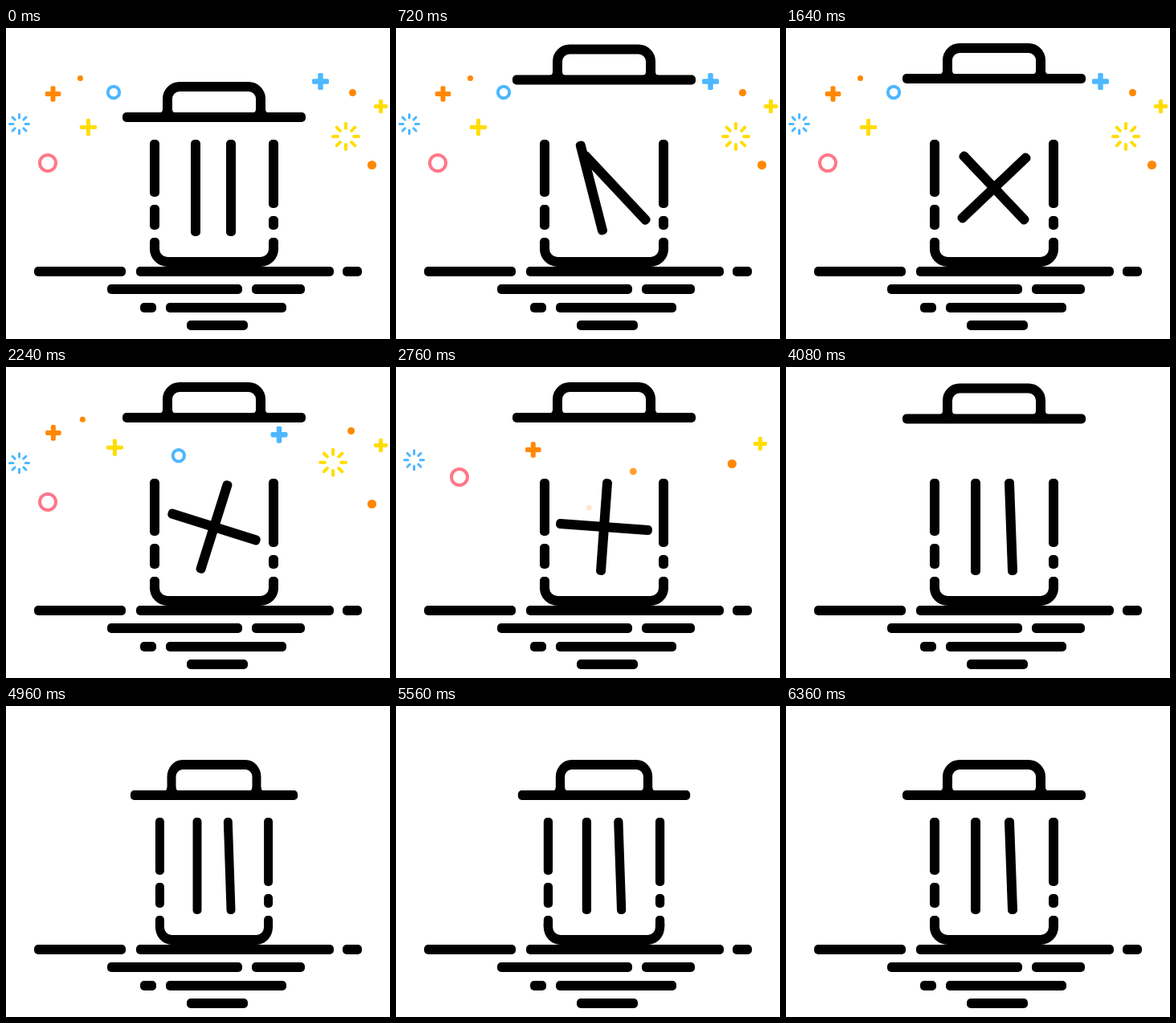
Recreate the animation shown at these times as an HTML page with a canvas. Size 478 px wide and 387 px high, loop 7200 ms.

```html
<!DOCTYPE html>
<html lang="en">
<head>
<meta charset="utf-8">
<title>Hungry trash can</title>
<style>
html, body { margin: 0; width: 100%; height: 100%; overflow: hidden; background: #fff; }
canvas { display: block; width: 478px; height: 387px; }
</style>
</head>
<body>
<canvas id="stage"></canvas>
<script>
const W = 478, H = 387, LOOP = 7200, STEP = 40;
const MID = 259, FLOOR = 297, BAR_Y = 199;
const ORANGE = '#ff8800', YELLOW = '#ffdd00', BLUE = '#4db8ff', PINK = '#ff7788';

const canvas = document.getElementById('stage');
const ctx = canvas.getContext('2d');
const dpr = window.devicePixelRatio || 1;
canvas.width = W * dpr;
canvas.height = H * dpr;

const clamp = v => Math.min(1, Math.max(0, v));
const span = (t, from, to) => clamp((t - from) / (to - from));
const mix = (a, b, p) => a + (b - a) * p;
const inOut = (u, n) => u < 0.5 ? 0.5 * (2 * u) ** n : 1 - 0.5 * (2 - 2 * u) ** n;
const rad = deg => deg * Math.PI / 180;

function pill(x, y, w, h, r = 5) {
  ctx.beginPath();
  ctx.roundRect(x, y, w, h, r);
  ctx.fill();
}

const shapes = {
  plus(size, thick) {
    pill(-size, -thick / 2, size * 2, thick, 1.8);
    pill(-thick / 2, -size, thick, size * 2, 1.8);
  },
  dot(r) {
    ctx.beginPath();
    ctx.arc(0, 0, r, 0, Math.PI * 2);
    ctx.fill();
  },
  ring(r, thick) {
    ctx.lineWidth = thick;
    ctx.beginPath();
    ctx.arc(0, 0, r, 0, Math.PI * 2);
    ctx.stroke();
  },
  burst(r, thick) {
    for (let i = 0; i < 8; i++) {
      pill(r * 0.45, -thick / 2, r * 0.55, thick, thick / 2);
      ctx.rotate(Math.PI / 4);
    }
  }
};

// shape, colour, x, y, size, thickness, departure time, height of the arc's control point
const bits = [
  ['ring', BLUE, 134, 80, 7.2, 4, 1600, 50],
  ['plus', BLUE, 391.5, 66.5, 10.5, 6.5, 1700, 66],
  ['plus', YELLOW, 102.5, 123.5, 10.7, 5, 1800, 45],
  ['burst', YELLOW, 423, 135, 18, 4, 1900, 40],
  ['dot', ORANGE, 92.5, 62.5, 3.5, 0, 2049, 143],
  ['dot', ORANGE, 431.5, 80.5, 4.5, 0, 2076, 33],
  ['plus', ORANGE, 58.5, 82, 9.8, 6, 2150, 59],
  ['dot', ORANGE, 455.5, 170.5, 5.6, 0, 2335, 6],
  ['ring', PINK, 52, 168, 10, 4, 2385, 30],
  ['plus', YELLOW, 466.5, 97.5, 8.7, 5, 2465, 77],
  ['burst', BLUE, 16.5, 119.5, 13.5, 3, 2544, 42]
];

function drawBit([shape, color, x, y, size, thick, start, peak], t) {
  const e = span(t, start, start + 740) ** 3;
  const alpha = clamp((0.918 - e) / 0.16);
  if (!alpha) return;
  ctx.save();
  ctx.globalAlpha = alpha;
  ctx.fillStyle = ctx.strokeStyle = color;
  ctx.translate(mix(x, MID, e), (1 - e) ** 2 * y + 2 * e * (1 - e) * peak + e * e * 185);
  shapes[shape](size, thick);
  ctx.restore();
}

// top edge, then pairs of left and right ends
const ground = [
  [297, 35, 149, 162, 408, 419, 443],
  [319, 126, 294, 306, 372],
  [342, 167, 187, 199, 349],
  [364, 225, 301]
];

function drawGround() {
  for (const [y, ...ends] of ground) {
    for (let i = 0; i < ends.length; i += 2) pill(ends[i], y, ends[i + 1] - ends[i], 12);
  }
}

function drawLid(t) {
  const lift = 48 * (inOut(span(t, 400, 800), 3) - inOut(span(t, 4000, 4400), 3));
  ctx.save();
  ctx.translate(0, -lift);
  pill(145, 105, 228, 12);
  ctx.lineWidth = 12;
  ctx.beginPath();
  ctx.moveTo(201, 108);
  ctx.arcTo(201, 73, MID, 73, 15);
  ctx.arcTo(317, 73, 317, 108, 15);
  ctx.lineTo(317, 108);
  ctx.stroke();
  for (const x of [201, 317]) {
    ctx.beginPath();
    ctx.moveTo(x - 6, 101);
    ctx.quadraticCurveTo(x - 6, 105, x - 10, 105.5);
    ctx.lineTo(x + 10, 105.5);
    ctx.quadraticCurveTo(x + 6, 105, x + 6, 101);
    ctx.fill();
  }
  ctx.restore();
}

function drawBody() {
  pill(179, 139, 12, 71);
  pill(179, 220, 12, 31);
  pill(327, 139, 12, 85);
  pill(327, 234, 12, 17);
  pill(179, 261, 12, 14, [5, 5, 0, 0]);
  pill(327, 261, 12, 14, [5, 5, 0, 0]);
  ctx.lineWidth = 12;
  ctx.beginPath();
  ctx.moveTo(185, 270);
  ctx.arcTo(185, 291, MID, 291, 16);
  ctx.arcTo(333, 291, 333, 270, 16);
  ctx.lineTo(333, 270);
  ctx.stroke();
}

function drawBar(offset, deg) {
  ctx.save();
  ctx.translate(offset, 0);
  ctx.rotate(rad(deg));
  pill(-6, -60, 12, 120);
  ctx.restore();
}

// the two bars cross, spin as a pair, then part again
function drawBars(t) {
  const cross = inOut(span(t, 400, 1200), 2);
  const part = inOut(span(t, 3130, 3930), 2);
  const closed = cross - part;
  const spin = 202 * span(t, 1600, 3130) ** 1.346 + 158 * part;
  ctx.save();
  ctx.translate(MID, BAR_Y);
  ctx.rotate(rad(spin));
  drawBar(-23 * (1 - closed), -45 * closed);
  drawBar(21 * (1 - closed), -135 * cross + 132.9 * part);
  ctx.restore();
}

function drawCan(t) {
  const chew = 1 - 0.105 * (1 - Math.cos(4 * Math.PI * span(t, 4800, 5680))) / 2;
  const swing = Math.sin(2 * Math.PI * span(t, 5800, 6360));
  ctx.save();
  ctx.translate(MID, FLOOR - 11 * Math.abs(swing));
  ctx.rotate(rad(-swing * (swing > 0 ? 18.7 : 17.3)));
  ctx.scale(chew, 1);
  ctx.translate(-MID, -FLOOR);
  drawLid(t);
  drawBody();
  drawBars(t);
  ctx.restore();
}

function draw(t) {
  ctx.setTransform(dpr, 0, 0, dpr, 0, 0);
  ctx.fillStyle = '#fff';
  ctx.fillRect(0, 0, W, H);
  for (const bit of bits) drawBit(bit, t);
  ctx.fillStyle = ctx.strokeStyle = '#000';
  drawGround();
  drawCan(t);
}

const origin = performance.now();
function tick() {
  const t = (performance.now() - origin) % LOOP;
  draw(Math.floor(t / STEP) * STEP);
  requestAnimationFrame(tick);
}
tick();
</script>
</body>
</html>
```
